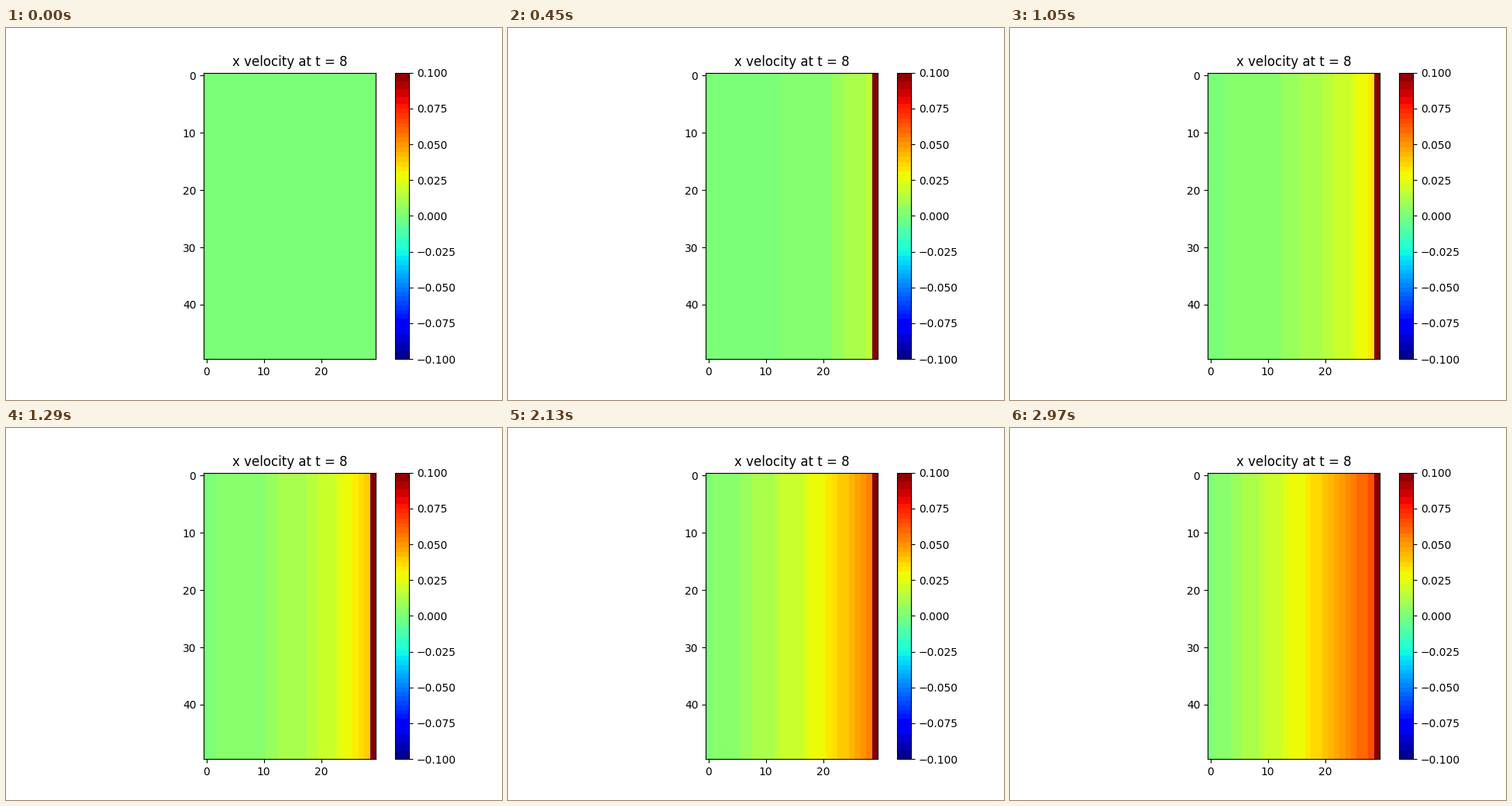
Animation of 640x480 px, one loop 3 s. Source, as a matplotlib script:

```python
import numpy as np
import matplotlib.pyplot as plt
from matplotlib.animation import FuncAnimation
from matplotlib.colors import ListedColormap

NX, NY = 30, 50
FRAMES, INTERVAL = 100, 30
WALL = 0.1
COLUMN_WEIGHT = 100  # area of one flow column relative to one colour-bar level

JET = plt.get_cmap("jet")(np.arange(256), bytes=True)[:, :3].astype(int)
BAND = np.unique(JET // [32, 16, 32], axis=0, return_inverse=True)[1].ravel()


def velocity(t):
    """Shear flow spreading from the moving right wall to the left one."""
    if t == 0:
        return np.zeros(NX)
    x = np.arange(NX)
    near = NX - 2
    speed = 0.092 * (1 - np.exp(-t / 80))
    steep = 0.142 * np.exp(-0.0103 * t)
    front = (t / 3.25) ** -3.5
    u = speed * np.sinh(steep * x) / np.sinh(steep * near)
    u *= np.exp(-front * (near - x) ** 2)
    u[-1] = WALL
    return u


def banded_jet(u):
    """Jet in coarse bands, each the mean of its colours weighted by use."""
    level = np.clip((u / WALL + 1) * 128, 0, 255).astype(int)
    weight = 1 + COLUMN_WEIGHT * np.bincount(level, minlength=256)
    total = np.bincount(BAND, weight)
    means = [np.bincount(BAND, weight * c) / total for c in JET.T]
    return ListedColormap(np.transpose(means)[BAND] / 255)


def update(t):
    u = velocity(t)
    image.set_data(np.tile(u, (NY, 1)))
    image.set_cmap(banded_jet(u))
    return [image]


fig, ax = plt.subplots(figsize=(6.4, 4.8), dpi=100)
image = ax.imshow(np.zeros((NY, NX)), cmap=banded_jet(velocity(0)),
                  vmin=-WALL, vmax=WALL, interpolation="nearest")
ax.set_title("x velocity at t = 8")
fig.colorbar(image)

anim = FuncAnimation(fig, update, frames=FRAMES, interval=INTERVAL,
                     repeat=True, repeat_delay=0)
plt.show()
```
